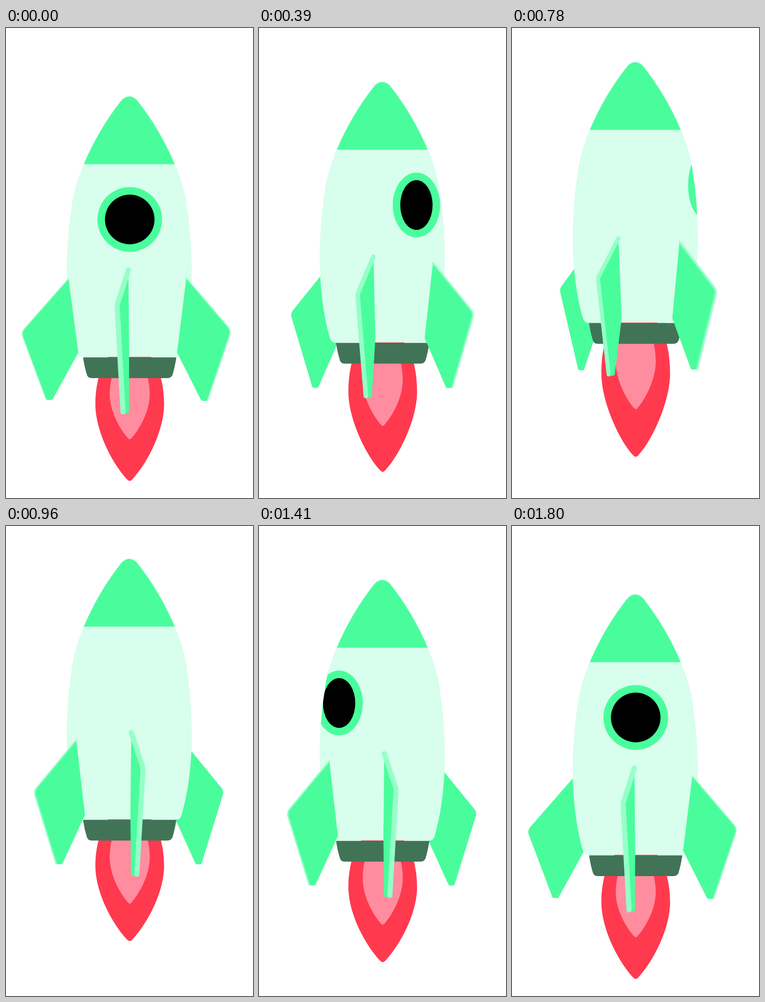
These frames come from a looping animation (543 px wide and 1031 px high, 1.83 s). An HTML page with a canvas:

```html
<!DOCTYPE html>
<html lang="en">
<head>
<meta charset="utf-8">
<title>Rocket</title>
<style>
  html, body { margin: 0; width: 100%; height: 100%; overflow: hidden; background: #fff; }
  canvas { display: block; width: 543px; height: 1031px; }
</style>
</head>
<body>
<canvas id="stage"></canvas>
<script>
const STEP = 30, LOOP = 1830, TURN = 1800;
const FIN_X = 271.3;
const GREEN = '#4afd9c', MINT = '#95ffc8', PALE = '#d8feed';
const RED = '#ff3a4f', PINK = '#ff8d9f', NOZZLE = '#417457';

const canvas = document.getElementById('stage');
const ratio = window.devicePixelRatio || 1;
canvas.width = 543 * ratio;
canvas.height = 1031 * ratio;
const ctx = canvas.getContext('2d');

const body = new Path2D(`M171 298 C157 332 148 360 144 396 C137 440 133.5 490 133.5 535
  C133.5 600 142 665 156 712 Q159 722 168 722 H374 Q383 722 386 712
  C400 665 408.5 600 408.5 535 C408.5 490 405 440 398 396 C394 360 385 332 371 298 Z`);
const nose = new Path2D(`M171.5 298.5 Q204 222 254 159 Q262 150.5 271 150.5
  Q280 150.5 288 159 Q338 222 370.5 298.5 Z`);
const nozzle = new Path2D(`M169.5 722.5 H374.5 Q371 745 366 761 Q363 768 355 768
  H188 Q180.5 768 178 761 Q172 742 169.5 722.5 Z`);

// Each fin starts at its own phase; reach values adjust how far it stands out
// behind on the right, behind on the left, and in front on the left.
const fins = [
  { phase: 0,    backRight: 115, backLeft: -151, frontLeft: -130 },
  { phase: -450, backRight: 115, backLeft: -145, frontLeft: -122 },
  { phase: -900, backRight: 115, backLeft: -137, frontLeft: -130 },
  { phase: 450,  backRight: 147, backLeft: -145, frontLeft: -139 }
];
for (const fin of fins) {
  fin.track = [
    [0, -27], [60, 30], [90, 59], [240, 133], [330, 176], [450, 220], [510, 205],
    [540, 176], [690, fin.backRight], [780, 78], [960, 0], [1140, fin.backLeft],
    [1230, -165], [1350, -234], [1410, -207], [1440, -194], [1590, fin.frontLeft],
    [1680, -82], [1800, -27]
  ];
}

function sample(track, u) {
  let i = 1;
  while (track[i][0] < u) i++;
  const [t0, a] = track[i - 1], [t1, b] = track[i];
  return a + (b - a) * (u - t0) / (t1 - t0);
}

function fill(path, color) {
  ctx.fillStyle = color;
  ctx.fill(path);
}

function lift(t) {
  const p = 1 - Math.abs(t / 900 - 1);
  return -79 * p * p * (3 - 2 * p);
}

function wave(t, mid, amp, peak) {
  return mid + amp * Math.cos(2 * Math.PI * (t - peak) / 450);
}

function drawFin(reach, front) {
  const side = reach < 0 ? -1 : 1, d = Math.abs(reach);
  const near = Math.min(1, d / 27);
  const at = x => FIN_X + side * x;
  const top = [at(0.637 * d - 15 * near), 525 + 0.105 * d];
  const outer = [at(d + d * d / 14000), 600 + 0.29 * d];
  const root = [at(0.54 * d - 14 * near), 712];
  const tip = 0.815 * d - 15 * near;
  const bottom = 850 - 0.145 * d;

  ctx.beginPath();
  ctx.moveTo(...top);
  ctx.arcTo(...outer, at(tip + 6), bottom, 16);
  ctx.arcTo(at(tip + 6), bottom, at(tip - 6), bottom, 5);
  ctx.arcTo(at(tip - 6), bottom, ...root, 5);
  ctx.lineTo(...root);
  ctx.closePath();
  ctx.fillStyle = GREEN;
  ctx.fill();
  if (!front) return;

  const width = 12.5 - 0.045 * d;
  const end = [at(tip + 7 * near), 852 - 0.15 * d - width / 2];
  ctx.beginPath();
  ctx.moveTo(top[0], top[1] + width / 4);
  ctx.arcTo(...outer, ...end, 18);
  ctx.lineTo(...end);
  ctx.lineWidth = width;
  ctx.lineCap = 'round';
  ctx.strokeStyle = MINT;
  ctx.stroke();
}

function drawFlame(t) {
  const tip = wave(t, 1004, 15, 285), wide = 722 + (tip - 722) * 0.38;
  fill(new Path2D(`M225 721.5 H319 C338 745 347.5 785 347.5 ${wide}
    C347.5 ${wide + 60} 309 ${tip - 37} 278 ${tip - 4} Q272 ${tip + 3} 266 ${tip - 4}
    C235 ${tip - 37} 196.5 ${wide + 60} 196.5 ${wide} C196.5 785 206 745 225 721.5 Z`), RED);

  const core = wave(t, 912, 9.5, 215), belly = 722 + (core - 722) * 0.45;
  fill(new Path2D(`M242 740 H302 Q316 770 316 ${belly}
    C316 ${belly + 37} 294 ${core - 23} 276 ${core - 3} Q272 ${core + 2} 268 ${core - 3}
    C250 ${core - 23} 228 ${belly + 37} 228 ${belly} Q228 770 242 740 Z`), PINK);
}

function drawWindow(t) {
  const away = Math.min(t, TURN - t);
  const x = t < 900 ? 272 + 0.19 * t : 272 - 0.246 * away;
  const rx = 54.5 - 0.0486 * away;
  ctx.save();
  ctx.clip(body);
  for (const [grow, color] of [[16.5, GREEN], [0, '#000']]) {
    ctx.beginPath();
    ctx.ellipse(x, 420, rx + grow, 54.5 + grow, 0, 0, 2 * Math.PI);
    ctx.fillStyle = color;
    ctx.fill();
  }
  ctx.restore();
}

function draw(t) {
  ctx.setTransform(ratio, 0, 0, ratio, 0, 0);
  ctx.clearRect(0, 0, 543, 1031);
  ctx.translate(0, lift(t));

  const poses = fins.map(({ phase, track }) => {
    const u = t + phase;
    return { reach: sample(track, (u + TURN) % TURN), front: Math.abs(u) <= 450 || u > 1350 };
  });
  const drawFins = front => poses.filter(p => p.front === front)
    .forEach(p => drawFin(p.reach, front));

  drawFins(false);
  fill(body, PALE);
  drawFlame(t);
  ctx.lineWidth = 2;
  ctx.strokeStyle = '#b4ffda';
  ctx.stroke(nose);
  fill(nose, GREEN);
  drawWindow(t);
  fill(nozzle, NOZZLE);
  drawFins(true);
}

const start = performance.now();
function tick() {
  const time = Math.max(0, performance.now() - start) % LOOP;
  draw(Math.floor(time / STEP) * STEP);
  requestAnimationFrame(tick);
}
tick();
</script>
</body>
</html>
```
